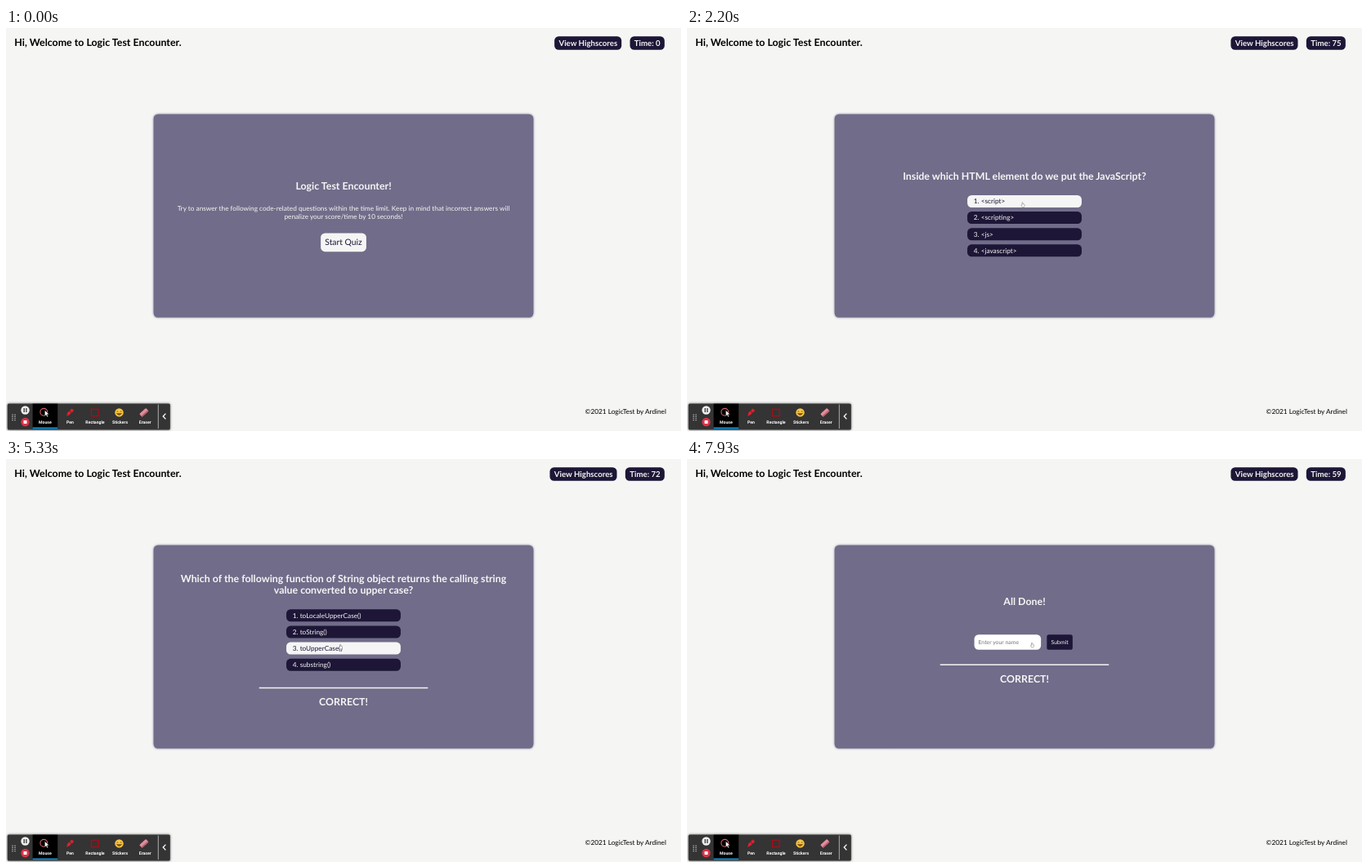
These frames come from a looping animation (826x494 px, 8000 ms). An HTML page:

```html
<!DOCTYPE html>
<html lang="en">
<head>
<meta charset="utf-8">
<title>Quiz</title>
<style>
  html, body { margin: 0; width: 100%; height: 100%; overflow: hidden; background: #f5f5f4; }
  body { position: relative; }
  .page { position: absolute; left: 0; top: 0; width: 1600px; height: 957px; transform: scale(.51625); transform-origin: 0 0; font: 16px/1.2 Lato, sans-serif; color: #000; text-rendering: geometricPrecision; }
  .welcome, .bold { font-weight: 700; font-size: 24px; }
  .welcome { position: absolute; left: 20px; top: 20px; white-space: nowrap; }
  .pills { position: absolute; right: 39px; top: 20px; display: flex; gap: 20px; }
  .pill { padding: 5px 10px; border-radius: 10px; background: #1d1636; color: #f5f5f5; font-weight: 700; font-size: 18.72px; white-space: nowrap; }
  .card { position: absolute; left: 350px; top: 205px; width: 900px; height: 482px; border-radius: 10px; background: #706c89; box-shadow: 0 0 5px rgba(40, 32, 80, .7); }
  .footer { position: absolute; right: 35px; top: 902px; white-space: nowrap; }
  .scene { position: absolute; inset: 0; visibility: hidden; color: #f5f5f5; }
  .scene.on { visibility: visible; }
  .row { position: absolute; left: 800px; transform: translate(-50%, -50%); text-align: center; white-space: nowrap; }
  .options { position: absolute; left: 800px; transform: translateX(-50%); min-width: 271px; width: max-content; }
  .option { box-sizing: border-box; height: 29px; margin-bottom: 10px; padding: 5px 10px 5px 15px; border-radius: 10px; background: #1d1636; white-space: nowrap; }
  .option.hover { background: #f5f5f5; color: #1d1636; }
  .rule { position: absolute; left: 600px; width: 400px; height: 3px; background: #f0f0f2; }
  .start { padding: 10px; border-radius: 10px; background: #f5f5f5; color: #1d1636; font-size: 20px; }
  .field, .submit { position: absolute; box-sizing: border-box; top: 417px; height: 36px; font-size: 13.33px; line-height: 36px; padding-left: 10px; white-space: nowrap; }
  .field { left: 680.5px; width: 158px; border-radius: 10px; background: #fff; color: #757575; }
  .submit { left: 853px; width: 61px; border-radius: 5px; background: #1d1636; }
  svg { position: absolute; left: 0; top: 0; width: 826px; height: 494px; }
  .bar { filter: drop-shadow(0 0 1.5px rgba(0, 0, 0, .65)); }
  .bar text { font: 700 5.16px Roboto, sans-serif; fill: #fff; text-anchor: middle; text-rendering: geometricPrecision; }
</style>
</head>
<body>
<div class="page">
  <div class="welcome">Hi, Welcome to Logic Test Encounter.</div>
  <div class="pills"><div class="pill">View Highscores</div><div class="pill" id="timer">Time: 0</div></div>
  <div class="card"></div>
  <div id="scenes">
    <div class="scene">
      <div class="row bold" style="top:376px">Logic Test Encounter!</div>
      <div class="row" style="top:439px">Try to answer the following code-related questions within the time limit. Keep in mind that incorrect answers will<br>penalize your score/time by 10 seconds!</div>
      <div class="row start" style="top:509px">Start Quiz</div>
    </div>
  </div>
  <div class="footer">©2021 LogicTest by Ardinel</div>
</div>

<svg class="bar" viewBox="0 0 826 494">
  <rect x="1.8" y="460.6" width="199" height="31.8" rx="1.5" fill="#343434"/>
  <path d="M8 473.5v8M11 473.5v8" stroke="#ccc" stroke-width="1.2" stroke-dasharray="1.2 1"/>
  <rect x="32.6" y="460.6" width="30.6" height="31" fill="#000"/>
  <rect x="32.6" y="489.6" width="30.6" height="1.8" fill="#1698e0"/>
  <circle cx="23.5" cy="468.5" r="5.2" fill="#eee"/>
  <path d="M22.2 466v5M24.9 466v5" stroke="#333" stroke-width="1.3"/>
  <circle cx="23.5" cy="483" r="5.2" fill="#dc3349"/>
  <rect x="21.5" y="481" width="4" height="4" rx=".5" fill="#fff"/>
  <circle cx="46.3" cy="470.8" r="4.4" fill="none" stroke="#d5636c" stroke-width="1.1"/>
  <path d="M47.4 468.6v7.2l1.7-1.6 1.2 2.6 1.2-.6-1.2-2.5 2.3-.2z" fill="#fff" stroke="#000" stroke-width=".4"/>
  <path d="M74.2 475.8l1-4.2 2.2-2 2.4 2.2-1.9 2.3zM78 469l2.4-2.6 2.8 2.4-2.6 2.7z" fill="#e3202b"/>
  <rect x="104.5" y="467.2" width="8.6" height="8.4" fill="none" stroke="#a80d16" stroke-width="1.3"/>
  <circle cx="138.5" cy="471.4" r="5.2" fill="#f8c63d"/>
  <path d="M135.4 470.3q1-1.3 2 0M139.6 470.3q1-1.3 2 0M135.4 472.5q3.1 4 6.2 0z" fill="#87501d" stroke="#70421a" stroke-width=".6"/>
  <g transform="rotate(-42 168.8 471.3)"><rect x="163.4" y="468.8" width="10.8" height="5" rx="1" fill="#e58d9d"/><rect x="163.4" y="472.2" width="10.8" height="1.7" rx=".7" fill="#b9626f"/></g>
  <path d="M186.3 461.5v29.5" stroke="#bbb" stroke-width=".9"/>
  <path d="M195.4 472.6l-3.2 3.4 3.2 3.4" fill="none" stroke="#fff" stroke-width="1.3"/>
  <text x="47.9" y="484.8">Mouse</text><text x="78.4" y="484.8">Pen</text><text x="109" y="484.8">Rectangle</text>
  <text x="139.6" y="484.8">Stickers</text><text x="170.2" y="484.8">Eraser</text>
</svg>

<svg viewBox="0 0 826 494">
  <g id="pointer">
    <circle id="ring" cy="2" r="8.4" fill="none" stroke="#cf3a50" stroke-width="1.1"/>
    <path id="arrow" d="M0 0v3.9l.9-.8.8 1.5.6-.3-.7-1.4h1.2z" fill="#fff" stroke="#333" stroke-width=".25"/>
    <path id="hand" d="M-.5 3V.4q.5-.8 1 0v1.7l2 .6v1.8L1.8 6H-.2L-1.7 3.6q.4-.9 1.2 0z" fill="#fff" stroke="#555" stroke-width=".4"/>
  </g>
</svg>

<script>
const LOOP = 8000;
const SCALE = .51625;
const ROW = 29, STEP = 39; // option height and spacing in page units
const find = id => document.getElementById(id);
const scenesBox = find('scenes');

// y is the centre of the last heading line
const questions = [
  { y: 353, title: ['Inside which HTML element do we put the JavaScript?'],
    options: ['<script>', '<scripting>', '<js>', '<javascript>'] },
  { y: 313, title: ['Which of the following function of Number object returns the number\'s', 'value?'],
    options: ['toString()', 'toLocaleString()', 'toPrecision()', 'valueOf()'], verdict: 'CORRECT!' },
  { y: 313, title: ['Which of the following function of String object returns the calling string', 'value converted to upper case?'],
    options: ['toLocaleUpperCase()', 'toString()', 'toUpperCase()', 'substring()'], verdict: 'CORRECT!' },
  { y: 299, title: ['What does HTML stands for?'],
    options: ['Hypertext Machine language', 'Hypertext and links markup language', 'Hypertext Markup Language', 'Hightext machine language'], verdict: 'INCORRECT!' }
];

const escapeText = s => s.replace(/</g, '&lt;').replace(/>/g, '&gt;');
const heading = (y, html) => `<div class="row bold" style="top:${y}px">${html}</div>`;
const verdictBlock = (y, text) => `<div class="rule" style="top:${y - 1.5}px"></div>` + heading(y + 35, text);
const addScene = html => scenesBox.insertAdjacentHTML('beforeend', `<div class="scene">${html}</div>`);

for (const q of questions) {
  q.top = q.y + 44;
  const rows = q.options.map((o, i) => `<div class="option">${i + 1}. ${escapeText(o)}</div>`).join('');
  addScene(heading(q.y - (q.title.length - 1) * 14.4, q.title.join('<br>')) +
    `<div class="options" style="top:${q.top}px">${rows}</div>` +
    (q.verdict ? verdictBlock(q.y + 230, q.verdict) : ''));
}
addScene(heading(339, 'All Done!') + '<div class="field">Enter your name</div><div class="submit">Submit</div>' +
  verdictBlock(488, 'CORRECT!'));

const scenes = [...scenesBox.children];
const sceneStarts = [0, 730, 3060, 4800, 6260, 7530];
const clicks = [[660, 860], [2930, 3300], [4600, 4930], [6060, 6400], [7400, 7660]];
const clock = [[0, 0], [1730, 75], [2600, 74], [3600, 73], [4600, 72], [5600, 71], [6260, 61], [6600, 60], [7600, 59]];
const path = [
  [0, 410, 263], [1130, 410, 263], [1400, 408, 220.4], [1530, 409, 216], [1730, 409, 216], [2330, 411, 213],
  [3600, 411.5, 213], [3930, 413.3, 233.3], [4200, 412, 250], [4860, 412, 250], [5330, 409, 227],
  [5600, 409, 227], [6000, 411.5, 212.8], [6800, 411.5, 212.8], [6930, 412.5, 223], [7600, 412.5, 223], [7930, 422, 225], [8000, 422, 225]
];

function pointerAt(t) {
  const i = path.findIndex(p => p[0] > t);
  const [t0, x0, y0] = path[i - 1], [t1, x1, y1] = path[i];
  const k = (t - t0) / (t1 - t0);
  return [x0 + (x1 - x0) * k, y0 + (y1 - y0) * k];
}

const show = (el, on) => { el.style.display = on ? '' : 'none'; };

function draw(t) {
  const current = sceneStarts.filter(s => s <= t).length - 1;
  scenes.forEach((s, i) => s.classList.toggle('on', i === current));
  find('timer').textContent = 'Time: ' + clock.filter(c => c[0] <= t).pop()[1];

  const [x, y] = pointerAt(t);
  const question = questions[current - 1];
  let hovered = -1;
  if (question) {
    const offset = y / SCALE - question.top;
    if (offset >= 0 && offset % STEP < ROW) hovered = Math.floor(offset / STEP);
    scenes[current].querySelectorAll('.option').forEach((o, i) => o.classList.toggle('hover', i === hovered));
  }
  const overLink = !question || hovered >= 0;
  find('pointer').setAttribute('transform', `translate(${x} ${y})`);
  show(find('pointer'), t >= 660);
  show(find('hand'), overLink);
  show(find('arrow'), !overLink);
  show(find('ring'), clicks.some(([a, b]) => t >= a && t < b));
}

const startTime = performance.now();
function tick() {
  draw((performance.now() - startTime) % LOOP);
  requestAnimationFrame(tick);
}
tick();
</script>
</body>
</html>
```
